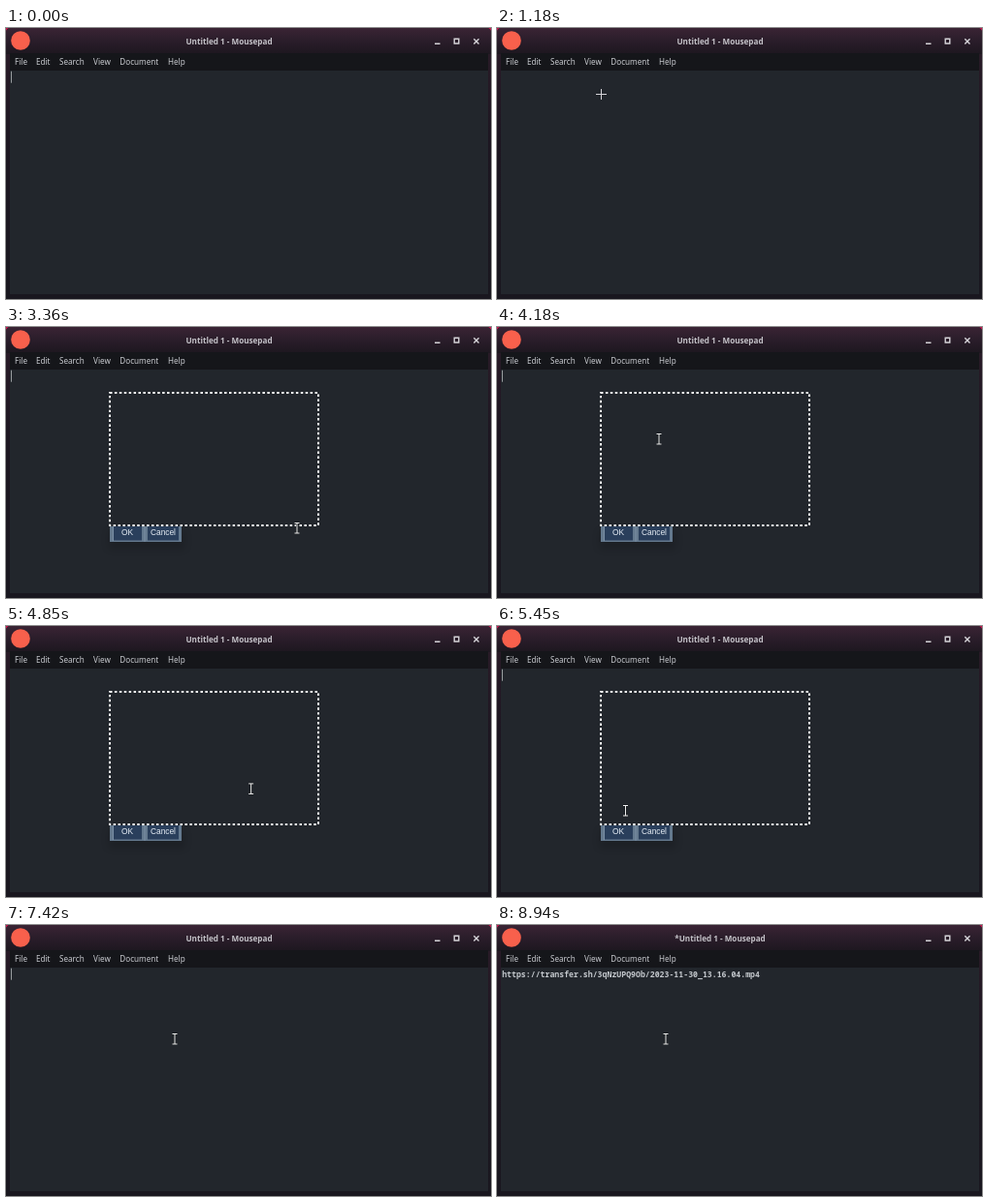
An HTML page for the animation above (9000 ms loop, 500 by 280 pixels).

```html
<!DOCTYPE html>
<html lang="en">
<head>
<meta charset="utf-8">
<title>Text editor</title>
<style>
  html, body { margin: 0; width: 100%; height: 100%; overflow: hidden; background: #17131b; }
  svg { display: block; width: 500px; height: 280px; }
  text { font: 8.15px "Noto Sans", "Open Sans", sans-serif; fill: #c9cbd0; white-space: pre; }
  .title { font-weight: 700; fill: #c4c2c8; text-anchor: middle; }
  .mono { font: 700 8.21px "Noto Sans Mono", "DejaVu Sans Mono", monospace; fill: #c3c7cc; }
  .button { font: 8.35px "Liberation Sans", Arial, sans-serif; fill: #e6edf5; text-anchor: middle; }
  .line { fill: none; stroke: #d5d3d8; }
</style>
</head>
<body>
<svg viewBox="0 0 500 280">
  <defs>
    <linearGradient id="bar" x2="0" y2="1">
      <stop stop-color="#3a2434"/><stop offset=".5" stop-color="#2a1d2a"/><stop offset="1" stop-color="#1d171f"/>
    </linearGradient>
    <linearGradient id="frame" x2="0" y2="1">
      <stop stop-color="#2c1c29"/><stop offset=".4" stop-color="#1d1621"/><stop offset="1" stop-color="#19171f"/>
    </linearGradient>
    <filter id="blur" x="-20%" y="-60%" width="140%" height="220%"><feGaussianBlur stdDeviation="4"/></filter>
  </defs>

  <rect width="500" height="10" fill="#c4164f"/>
  <path d="M0 280V5Q0 0 5 0H495Q500 0 500 5V280z" fill="url(#frame)"/>
  <path d="M0 27V5Q0 0 5 0H495Q500 0 500 5V27z" fill="url(#bar)"/>
  <circle cx="15" cy="13" r="9.8" fill="#f8604c"/>
  <text id="title" class="title" x="230" y="17"></text>
  <path class="line" stroke-width="1.4" d="M442 16.3h5.5M462.2 11.2h4.6v4.8h-4.6zM482.3 11.3l5.2 5.2m0-5.2l-5.2 5.2"/>
  <rect x="4" y="26" width="493" height="18" fill="#15161a"/>
  <g id="menu"></g>
  <rect x="4" y="44" width="493" height="231" fill="#22262c"/>

  <text id="link" class="mono" x="5.2" y="53.6">https://transfer.sh/3qNzUPQ9Ob/2023-11-30_13.16.04.mp4</text>
  <rect id="caret" x="5" width="1" height="12" fill="#989c9f"/>
  <rect id="selection" x="107.5" y="68.5" fill="none" stroke="#858789"/>

  <g id="recorder">
    <rect x="106" y="211" width="78" height="18" fill="#000" opacity=".16" filter="url(#blur)"/>
    <rect x="107" y="68" width="215" height="137" fill="none" stroke="#fff" stroke-width="2" stroke-dasharray="2.46"/>
    <rect x="107" y="206" width="74" height="16" fill="#64798e"/>
    <path d="M111 206h29v14.5h-29zM146 206h32v14.5h-32z" fill="#2a3f5c"/>
    <path d="M110.5 206v15M143 206v16" stroke="#8195aa" stroke-width=".8"/>
    <text class="button" x="125" y="215.2">OK</text>
    <text class="button" x="162" y="215.2">Cancel</text>
  </g>

  <g id="pointer">
    <path id="cross" class="line" d="M-5 .5H6M.5-5V6"/>
    <path id="corner" class="line" d="M-10 .5H.5V-10"/>
    <g id="beam" fill="none">
      <path d="M-2.5-5.5H2.5M0-5.5V5M-2.5 5H2.5" stroke="#15181c" stroke-width="2.2"/>
      <path d="M-2.5-5.5H2.5M0-5.5V5M-2.5 5H2.5" stroke="#eee"/>
    </g>
  </g>
</svg>
<script>
const LOOP = 9000, PASTE = 8090;
const $ = id => document.getElementById(id);
const show = (id, on) => $(id).style.display = on ? '' : 'none';
const within = (t, spans) => spans.some(([a, b]) => t >= a && t < b);
const clamp = v => Math.min(1, Math.max(0, v));
const smooth = p => p * p * (3 - 2 * p);

[['File', 9], ['Edit', 31], ['Search', 55], ['View', 90], ['Document', 117.3], ['Help', 167]].forEach(([name, x]) =>
  $('menu').insertAdjacentHTML('beforeend', `<text x="${x}" y="38">${name}</text>`));

// Pointer path: time, x, y
const path = [
  [760, 500, 101], [1180, 107, 68], [2269, 107, 68], [2270, 322, 205], [2900, 322, 205],
  [3360, 300, 208], [3780, 250, 218], [4180, 167, 116], [4640, 235, 140], [4880, 253, 172],
  [5200, 185, 200], [5450, 132.5, 191], [5580, 126, 212], [5930, 126, 212], [6200, 135, 160],
  [6480, 143, 134], [6520, 143, 134], [6610, 147, 123], [6910, 147, 123], [7060, 174, 118], [LOOP, 174, 118]
];

// Slope at a key, flat where the motion stops or turns
function slope(i, k) {
  const a = path[i - 1], b = path[i], c = path[i + 1];
  return a && c && (b[k] - a[k]) * (c[k] - b[k]) > 0 ? (c[k] - a[k]) / (c[0] - a[0]) : 0;
}

function pathAt(t) {
  const i = Math.max(0, path.findIndex((p, n) => n < path.length - 1 && t < path[n + 1][0]));
  const a = path[i], b = path[i + 1], d = b[0] - a[0], p = clamp((t - a[0]) / d), q = 1 - p;
  return [1, 2].map(k => a[k] + (b[k] - a[k]) * smooth(p) + d * p * q * (q * slope(i, k) - p * slope(i + 1, k)));
}

function dragSize(t) {
  const p = clamp((t - 1390) / 640);
  return [215 * smooth(p ** .7), 137 * smooth(p ** .78)];
}

function caretOn(t) {
  if (t >= PASTE) return t < 8940;
  if (t >= 2700) return (t - 2700) % 1172 < 775;
  return within(t, [[0, 200], [2270, 2360]]);
}

function draw(t) {
  const pasted = t >= PASTE, dragging = within(t, [[1390, 2270]]);
  $('title').textContent = (pasted ? '*' : '') + 'Untitled 1 - Mousepad';
  show('link', pasted);
  show('caret', caretOn(t));
  $('caret').setAttribute('y', pasted ? 56.5 : 44.7);
  show('recorder', within(t, [[2880, 5900]]));

  show('selection', dragging);
  const [w, h] = dragSize(t);
  $('selection').setAttribute('width', w);
  $('selection').setAttribute('height', h);

  // The pointer runs slightly ahead of the selection box
  const ahead = dragSize(t + 50);
  const [x, y] = dragging ? [110 + ahead[0], 70 + ahead[1]] : pathAt(t);
  $('pointer').setAttribute('transform', `translate(${x} ${y})`);
  show('cross', within(t, [[760, 1390]]));
  show('corner', dragging);
  show('beam', t >= 2270);
}

let start;
function tick(now) {
  start ??= now;
  draw((now - start) % LOOP);
  requestAnimationFrame(tick);
}
draw(0);
requestAnimationFrame(tick);
</script>
</body>
</html>
```
